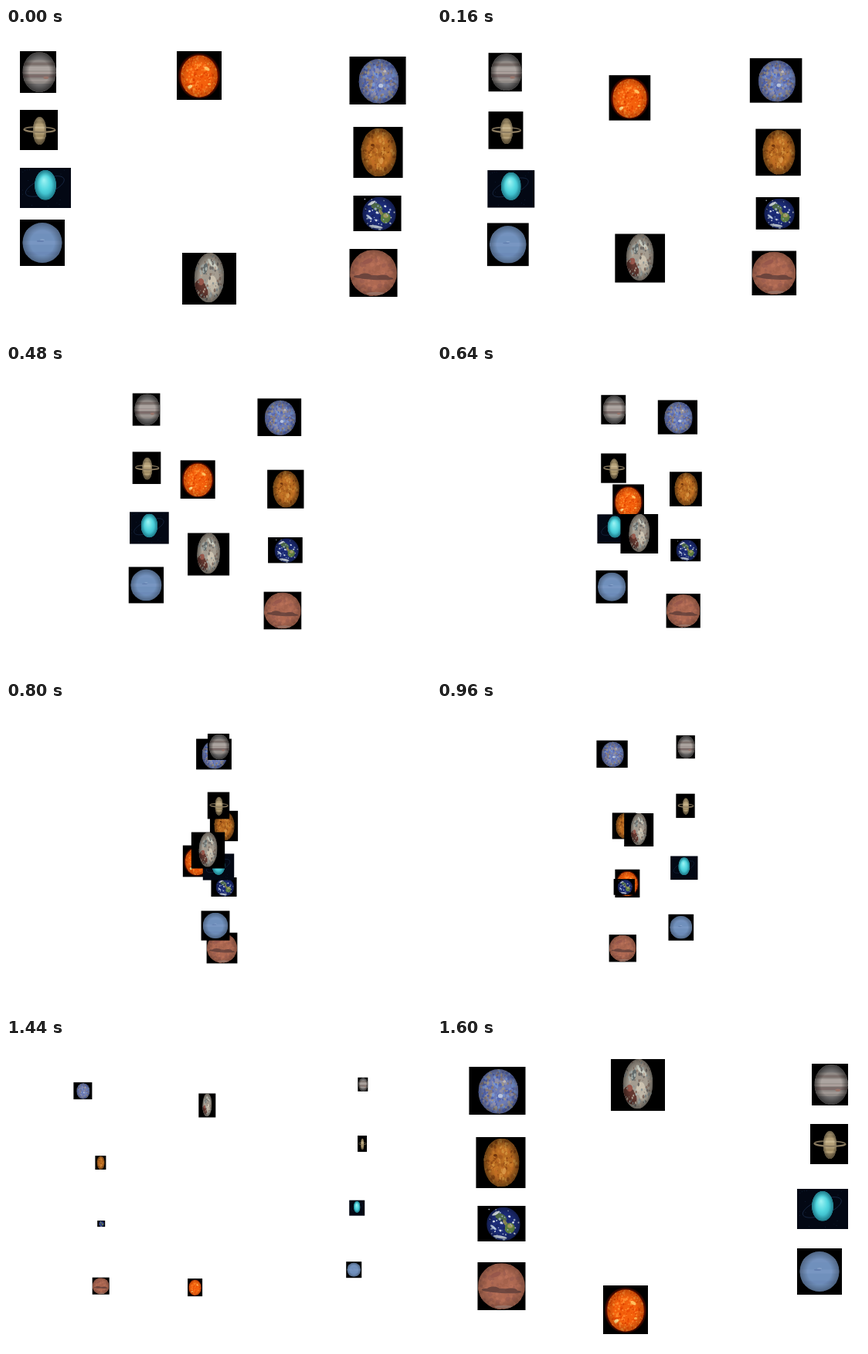
An HTML page with a canvas for the animation above (1.68 s loop, 550 by 400 pixels).

```html
<!DOCTYPE html>
<html lang="en">
<head>
<meta charset="utf-8">
<title>Planets</title>
<style>
html, body { margin: 0; width: 100%; height: 100%; overflow: hidden; background: #fff; }
canvas { display: block; }
</style>
</head>
<body>
<canvas id="stage" width="550" height="400"></canvas>
<script>
const ctx = document.getElementById('stage').getContext('2d');
const STEP_MS = 80, STEPS = 21, LAST = STEPS - 1, SHRINK_STEPS = 18;

function randomFrom(seed) {
  return () => {
    seed = (seed * 1664525 + 1013904223) >>> 0;
    return seed / 4294967296;
  };
}

function blob(x, y, rx, ry, color, turn = 0) {
  ctx.fillStyle = color;
  ctx.beginPath();
  ctx.ellipse(x, y, rx, ry, turn, 0, Math.PI * 2);
  ctx.fill();
}

function band(y, height, color) {
  ctx.fillStyle = color;
  ctx.fillRect(-1, y, 2, height);
}

function speckle(seed, count, size, colors) {
  const random = randomFrom(seed);
  for (let i = 0; i < count; i++) {
    const angle = random() * Math.PI * 2, radius = Math.sqrt(random());
    const r = size * (0.5 + random());
    blob(Math.cos(angle) * radius, Math.sin(angle) * radius, r, r * (0.6 + random() * 0.6),
      colors[i % colors.length], angle);
  }
}

// Paints a shaded globe; details use a unit circle inside the picture box.
function globe(cx, cy, rx, ry, color, details, shade = 0.5, tilt = 0) {
  ctx.save();
  ctx.translate(cx, cy);
  ctx.rotate(tilt);
  ctx.scale(rx, ry);
  ctx.beginPath();
  ctx.arc(0, 0, 1, 0, Math.PI * 2);
  ctx.clip();
  ctx.fillStyle = color;
  ctx.fillRect(-1, -1, 2, 2);
  details();
  const limb = ctx.createRadialGradient(0, 0, 0.6, 0, 0, 1);
  limb.addColorStop(0, 'rgba(0,0,0,0)');
  limb.addColorStop(1, `rgba(0,0,0,${shade})`);
  ctx.fillStyle = limb;
  ctx.fillRect(-1, -1, 2, 2);
  ctx.restore();
}

function ring(cx, cy, rx, ry, turn, color, width, from = 0, to = Math.PI * 2) {
  ctx.strokeStyle = color;
  ctx.lineWidth = width;
  ctx.beginPath();
  ctx.ellipse(cx, cy, rx, ry, turn, from, to);
  ctx.stroke();
}

function sun() {
  const glow = ctx.createRadialGradient(0.5, 0.51, 0.38, 0.5, 0.51, 0.48);
  glow.addColorStop(0, '#a01800');
  glow.addColorStop(1, '#000');
  blob(0.5, 0.51, 0.48, 0.48, glow);
  globe(0.5, 0.515, 0.41, 0.43, '#f4600c', () => {
    speckle(7, 260, 0.045, ['#ff8028', '#dc4400', '#fc8c2c', '#ec4c04']);
    blob(-0.5, 0.5, 0.13, 0.08, '#ffd884', -0.4);
    blob(0.42, -0.36, 0.16, 0.08, '#ffc060', 0.5);
    blob(0.55, 0.38, 0.09, 0.06, '#ffb048');
  }, 0.2);
}

function mercury() {
  globe(0.52, 0.515, 0.355, 0.465, '#6e7cb4', () => {
    speckle(21, 260, 0.06, ['#5468b4', '#8c8eac', '#5060a8', '#9a948c', '#7694d4', '#847878']);
    blob(0.1, 0.2, 0.12, 0.09, '#b8c4dc');
    blob(0.3, -0.45, 0.08, 0.06, '#c0b8b0');
  }, 0.3);
}

function venus() {
  globe(0.515, 0.5, 0.36, 0.475, '#b86c20', () => {
    speckle(34, 240, 0.06, ['#c87828', '#944c14', '#d08c38', '#a85c1c', '#c06c24']);
    blob(0.15, 0.35, 0.1, 0.14, '#d89444', 0.4);
    blob(-0.35, -0.3, 0.1, 0.06, '#70340c');
  }, 0.45);
}

function earth() {
  globe(0.54, 0.51, 0.35, 0.47, '#1c2c78', () => {
    blob(-0.15, -0.4, 0.38, 0.22, '#4c6848', 0.5);
    blob(0.12, -0.05, 0.1, 0.25, '#84804c', -0.6);
    blob(0.38, 0.25, 0.3, 0.32, '#5c7c40', 0.3);
    blob(0.4, 0.12, 0.16, 0.12, '#a0985c');
    speckle(56, 60, 0.05, ['#d4dce8', '#98acc8', '#18245c']);
    blob(-0.45, -0.64, 0.26, 0.08, '#e4ecf4', -0.5);
    blob(-0.2, 0.78, 0.42, 0.09, '#d0dcec', 0.15);
    blob(-0.6, 0.2, 0.22, 0.07, '#b8c8e0', 0.7);
  }, 0.35);
  blob(0.24, 0.1, 0.014, 0.018, '#b8c0d0');
}

function mars() {
  globe(0.5, 0.5, 0.49, 0.48, '#ac6852', () => {
    speckle(42, 160, 0.07, ['#b87058', '#a06050', '#b06a52', '#a4624c']);
    blob(-0.25, -0.5, 0.24, 0.1, '#98584c', -0.4);
    blob(0, 0.2, 0.85, 0.1, '#704840', 0.06);
    blob(-0.35, 0.14, 0.28, 0.12, '#6c443c');
    blob(0.4, 0.18, 0.26, 0.1, '#6c443c');
    blob(0.1, 0.9, 0.4, 0.07, '#b88878');
  }, 0.25);
}

function jupiter() {
  globe(0.535, 0.5, 0.46, 0.48, '#908a86', () => {
    band(-0.95, 0.35, '#7c7a7a');
    band(-0.48, 0.14, '#7c706c');
    band(-0.28, 0.22, '#aca4a0');
    band(-0.02, 0.1, '#aca09c');
    band(0.12, 0.16, '#7c6c6a');
    band(0.36, 0.1, '#a09894');
    band(0.58, 0.42, '#747272');
    blob(0.4, 0.28, 0.16, 0.07, '#98746a');
  }, 0.55);
}

function saturn() {
  const ringArgs = [0.52, 0.49, 0.41, 0.065, 0.02];
  ring(...ringArgs, '#7a6c54', 0.035, Math.PI, Math.PI * 2);
  globe(0.52, 0.52, 0.18, 0.345, '#b4a078', () => {
    band(-0.7, 0.18, '#9c8a66');
    band(-0.3, 0.14, '#c8b690');
    band(0.25, 0.2, '#a08c64');
    band(0.6, 0.4, '#8c7a58');
  }, 0.4);
  ring(...ringArgs, '#8c7c60', 0.045, 0, Math.PI);
}

function uranus() {
  const random = randomFrom(91), place = () => 0.02 + random() * 0.96;
  for (let i = 0; i < 28; i++) blob(place(), place(), 0.007, 0.009, '#18304c');
  ring(0.49, 0.46, 0.42, 0.18, -0.5, '#203454', 0.012);
  globe(0.5, 0.43, 0.21, 0.37, '#40c4d0', () => {
    const light = ctx.createRadialGradient(-0.15, -0.35, 0, 0, 0, 1);
    light.addColorStop(0, '#a0f4f4');
    light.addColorStop(0.5, '#54d8e0');
    light.addColorStop(1, '#28a4b8');
    band(-1, 2, light);
  }, 0.25);
}

function neptune() {
  globe(0.5, 0.5, 0.44, 0.435, '#7090bc', () => {
    band(-0.65, 0.2, '#7492be');
    band(-0.1, 0.2, '#7896c2');
    band(0.45, 0.15, '#6c8ab8');
    blob(-0.1, -0.08, 0.18, 0.04, '#6480b0');
    blob(0, -0.15, 0.12, 0.02, '#98b0d4');
  }, 0.3);
}

function pluto() {
  globe(0.5, 0.48, 0.275, 0.48, '#a49c90', () => {
    blob(-0.5, 0.48, 0.5, 0.3, '#643830', 0.5);
    blob(-0.55, 0.18, 0.2, 0.14, '#98584c');
    blob(0.2, 0.2, 0.3, 0.28, '#ccc2b0', -0.4);
    blob(0.42, 0.44, 0.34, 0.24, '#c0b8a8', 0.5);
    blob(0.2, -0.55, 0.4, 0.1, '#ccd0c4', 0.5);
    blob(-0.3, -0.35, 0.15, 0.24, '#646c6c', 0.4);
    speckle(15, 110, 0.05, ['#8c9494', '#b8a898', '#6c6864', '#a8b0ac', '#847064']);
  }, 0.4, 0.04);
}

// start and end are top-left corners at full size; small is the size late in the flight.
// aim is where the flight heads when that is not where the body reappears.
const bodies = [
  { paint: sun, size: [58, 63], start: [221, 30], end: [215, 319], small: [19, 23] },
  { paint: mercury, size: [73, 62], start: [444.5, 37], end: [41.5, 36], aim: [20.5, 36], small: [24, 22] },
  { paint: venus, size: [64, 66], start: [449.5, 128], end: [50.5, 127], small: [14, 18] },
  { paint: earth, size: [62, 46], start: [449.5, 217], end: [52.5, 216], small: [10, 8] },
  { paint: mars, size: [62, 62], start: [444.5, 286], end: [52.5, 289], small: [22, 22] },
  { paint: jupiter, size: [47, 54], start: [18, 30], end: [485, 32], small: [13, 18] },
  { paint: saturn, size: [49, 52], start: [18, 106], end: [483, 110], small: [12, 21] },
  { paint: uranus, sky: '#030814', size: [66, 52], start: [18, 181], end: [466, 194], small: [20, 20] },
  { paint: neptune, size: [58, 60], start: [18, 248], end: [466, 271], small: [20, 21] },
  { paint: pluto, size: [70, 67], start: [228, 291], end: [225, 26], small: [22, 31] }
];

const mix = (a, b, t) => a + (b - a) * t;

// Offset and length along one axis (0 = x, 1 = y).
function span({ size, start, end, aim = end, small }, axis, step) {
  const full = size[axis];
  if (step === LAST) return [end[axis], full];
  const length = mix(full, small[axis], step / SHRINK_STEPS);
  return [mix(start[axis], aim[axis], step / LAST) + (full - length) / 2, length];
}

function draw(step) {
  ctx.fillStyle = '#fff';
  ctx.fillRect(0, 0, 550, 400);
  for (const body of bodies) {
    const [x, w] = span(body, 0, step), [y, h] = span(body, 1, step);
    ctx.save();
    ctx.translate(x, y);
    ctx.scale(w, h);
    ctx.fillStyle = body.sky || '#000';
    ctx.fillRect(0, 0, 1, 1);
    body.paint();
    ctx.restore();
  }
}

let shown = -1;
const begin = performance.now();
function tick() {
  const step = Math.floor((performance.now() - begin) / STEP_MS) % STEPS;
  if (step !== shown) draw(shown = step);
  requestAnimationFrame(tick);
}
tick();
</script>
</body>
</html>
```
